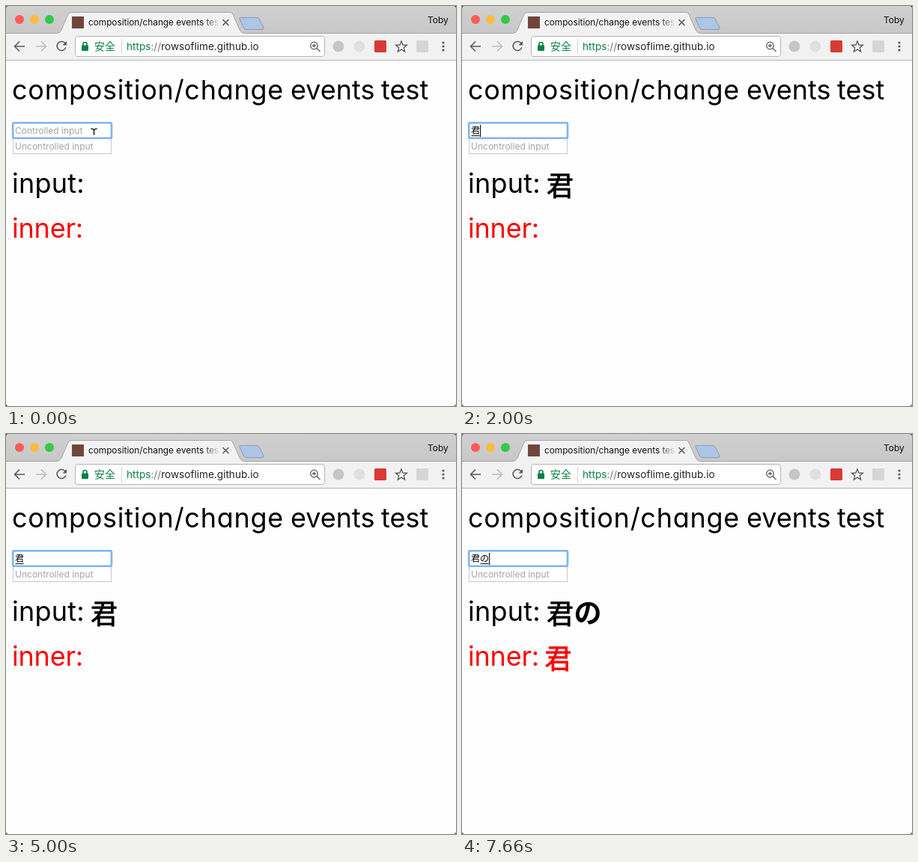
Animation, 601 px wide and 535 px high, one loop 8 s. Source, as an HTML page:

```html
<!DOCTYPE html>
<html lang="ja">
<head>
<meta charset="utf-8">
<title>composition/change events test</title>
<style>
  html, body { margin: 0; width: 100%; height: 100%; overflow: hidden; background: #fefefe; }
  svg { display: block; width: 601px; height: 535px; }
  text { font-family: Inter, "Noto Sans CJK JP", "Noto Sans CJK TC", sans-serif; white-space: pre; }
  .head { font-size: 36px; font-feature-settings: "cv11"; }
  .small { font-size: 12px; }
  .hint { fill: #a3a3a3; }
  .cjk { font-family: "Noto Sans CJK JP", "Noto Sans CJK SC", sans-serif; }
  .kanji { font-size: 36px; font-weight: 500; stroke-width: .8; }
  .kana { font-size: 37px; font-weight: 700; }
  .menu { font: 700 16px "Noto Serif CJK JP", "Noto Sans CJK JP", serif; }
  .line { fill: none; stroke: #5a5a5a; stroke-width: 1.6; }
  #popup { filter: drop-shadow(0 2px 4px rgba(0, 0, 0, .3)); }
</style>
</head>
<body>
<svg viewBox="0 0 601 535">
  <defs>
    <linearGradient id="strip" x2="0" y2="1">
      <stop stop-color="#d0d0d0"/><stop offset="1" stop-color="#c8c8c8"/>
    </linearGradient>
    <linearGradient id="fade" gradientUnits="userSpaceOnUse" x1="264" x2="286">
      <stop stop-color="#111"/><stop offset="1" stop-color="#111" stop-opacity="0"/>
    </linearGradient>
  </defs>

  <!-- tab strip -->
  <rect width="601" height="37" fill="url(#strip)"/>
  <circle cx="18" cy="18" r="6" fill="#fc5b57"/>
  <circle cx="38" cy="18" r="6" fill="#fdbc40"/>
  <circle cx="58" cy="18" r="6" fill="#34c84a"/>
  <rect y="36" width="601" height="37" fill="#f2f2f2"/>
  <path d="M0 36.5H68Q72 36 74 32L83 11Q84 8.500 87 8.500H299Q302 8.500 303 11L312 32Q314 36 318 36.500H601" fill="#f2f2f2" stroke="#a6a6a6"/>
  <path d="M313 15.500H335Q337 15.500 338 17L344 29Q345 31.500 342 31.500H321Q319 31.500 318 30L312 17.500Q311 15.500 313 15.500Z" fill="#adc5e7" stroke="#8f9bab"/>
  <rect x="88" y="14" width="16" height="16" fill="#70463c"/>
  <text x="110" y="26" font-size="11.8" fill="url(#fade)">composition/change events tes</text>
  <path d="M289.500 18L297.500 26M297.500 18L289.500 26" class="line"/>
  <text x="563" y="23" class="small" fill="#111">Toby</text>

  <!-- toolbar -->
  <path d="M0 72.500H601" stroke="#b6b6b6"/>
  <path d="M25 54H12M18 47.500L11.500 54L18 60.500" class="line"/>
  <path d="M40 54H53M47 47.500L53.500 54L47 60.500" class="line" style="stroke:#bcbcbc"/>
  <path d="M79 50A6 6 0 1 0 79.800 55.500" class="line"/>
  <path d="M81 47V52.500H75.500Z" fill="#5a5a5a"/>
  <rect x="92.500" y="40.500" width="333" height="27" rx="3" fill="#fff" stroke="#b5b5b5"/>
  <rect x="101" y="52.500" width="9" height="7.500" rx="1" fill="#0b8043"/>
  <path d="M103 53V51A2.500 2.500 0 0 1 108 51V53" class="line" style="stroke:#0b8043"/>
  <text x="118" y="59" font-size="14" fill="#0b8043" class="cjk">安全</text>
  <path d="M154.500 44V65" stroke="#d2d2d2"/>
  <text x="161" y="59" font-size="13.6" fill="#222"><tspan fill="#0b8043">https</tspan><tspan fill="#777">://</tspan>rowsoflime.github.io</text>
  <g class="line" style="stroke-width:1.300">
    <circle cx="411.500" cy="53" r="4.800"/>
    <path d="M409 53H414M411.500 50.500V55.500M415 56.500L419.500 61"/>
    <path d="M528 47L530 52L535.500 52.300L531.300 55.800L532.700 61L528 58.100L523.300 61L524.700 55.800L520.500 52.300L526 52Z"/>
  </g>
  <circle cx="444" cy="54" r="7.500" fill="#c6c6c6"/>
  <circle cx="472" cy="54" r="7.500" fill="#e0e0e0"/>
  <rect x="492" y="46" width="16" height="16" rx="1.500" fill="#d93a35"/>
  <rect x="548" y="46" width="16" height="16" rx="1.500" fill="#d6d6d6"/>
  <g fill="#5a5a5a">
    <circle cx="584" cy="49" r="1.600"/><circle cx="584" cy="54" r="1.600"/><circle cx="584" cy="59" r="1.600"/>
  </g>

  <!-- page -->
  <rect y="73" width="601" height="462" fill="#fefefe"/>
  <g class="head">
    <text x="8" y="125" letter-spacing=".75">composition/change</text>
    <text x="380" y="125">events</text>
    <text x="501" y="125">test</text>
    <text x="8" y="250" letter-spacing=".25">input:</text>
    <text x="8" y="310" letter-spacing="-.2" fill="#f00">inner:</text>
    <g id="input" stroke="#000" stroke-width="0"></g>
    <g id="inner" fill="#f00" stroke="#f00" stroke-width="0"></g>
  </g>
  <rect x="9.500" y="177.500" width="131" height="20" fill="#fff" stroke="#c9c9c9"/>
  <text x="12" y="192" class="small hint">Uncontrolled input</text>
  <rect x="9.200" y="156.200" width="131.800" height="20.600" rx="1.500" fill="#fff" stroke="#7db4f2" stroke-width="2.600"/>
  <text id="hint" x="12" y="171" class="small hint">Controlled input</text>
  <g id="field" class="small"></g>
  <rect id="mark" y="173" height="1" fill="#111"/>
  <rect id="caret" y="159" width="1" height="16"/>
  <path id="pointer" d="M113.500 164Q117 164 117.500 167Q118 164 121.500 164M117.500 166V172.500" fill="none" stroke="#222" stroke-width="1.500"/>

  <!-- candidate list -->
  <g id="popup">
    <rect x="1.500" y="179.500" width="95" height="158.500" rx="4" fill="#fff" stroke="#c4c4c4" stroke-width=".7"/>
    <path d="M2 207V184Q2 180 6 180H81V207Z" fill="#f6f6f6"/>
    <path d="M81 180H92Q96 180 96 184V316H81Z" fill="#f9f9f9"/>
    <path d="M81.500 180V316" stroke="#e7e7e7"/>
    <rect x="85" y="236" width="8" height="62" rx="4" fill="#c1c1c1"/>
    <rect x="5.500" y="210.500" width="72" height="20" rx="3" fill="#e4eefc" stroke="#b4cdf0"/>
    <g id="items"></g>
    <text x="32" y="331" font-size="10" fill="#909090" class="cjk">⋯更多</text>
  </g>

  <!-- window corners -->
  <path d="M0 531V535H4Q0 535 0 531ZM601 531V535H597Q601 535 601 531ZM0 4V0H4Q0 0 0 4ZM601 4V0H597Q601 0 601 4Z" fill="#555"/>
</svg>
<script>
const LOOP = 8000;
const $ = id => document.getElementById(id);

// time, typed text, first underlined character, caret x (0 = hidden), inner text
const steps = [
  [0, '', 0, 0, ''],
  [160, '', 0, 12, ''],
  [330, 'k', 0, 19, ''],
  [660, 'き', 0, 24, ''],
  [1160, 'き', 0, 0, ''],
  [1660, 'き', 0, 24, ''],
  [1830, 'きm', 0, 35, ''],
  [2000, '君', 0, 24, ''],
  [2500, '君', 0, 0, ''],
  [3000, '君', 0, 24, ''],
  [3500, '君', 0, 0, ''],
  [5830, '君', 1, 24, '君'],
  [6330, '君', 1, 0, '君'],
  [6830, '君', 1, 24, '君'],
  [7330, '君', 1, 0, '君'],
  [7500, '君n', 1, 32, '君'],
  [7660, '君の', 1, 36, '君']
];
const smallWidth = { k: 7, m: 11, n: 7 };

function addText(parent, str, x, y, cls) {
  const el = document.createElementNS('http://www.w3.org/2000/svg', 'text');
  el.setAttribute('x', x);
  el.setAttribute('y', y);
  el.setAttribute('class', cls);
  el.textContent = str;
  parent.append(el);
}

function drawLarge(id, str, x, y) {
  const group = $(id);
  group.replaceChildren();
  [...str].forEach((ch, i) => {
    const left = x + i * 37;
    if (ch < '\x7f') addText(group, ch, left, y, 'head');
    else if (ch === '君') addText(group, ch, left, y + 3.5, 'cjk kanji');
    else addText(group, ch, left - .5, y + 2.5, 'cjk kana');
  });
}

function show([, typed, from, caret, inner]) {
  $('field').replaceChildren();
  let x = 12, start = 12;
  [...typed].forEach((ch, i) => {
    if (i === from) start = x;
    addText($('field'), ch, x, 171, ch < '\x7f' ? 'small' : 'small cjk');
    x += smallWidth[ch] || 12;
  });
  $('mark').setAttribute('x', start + .5);
  $('mark').setAttribute('width', from < typed.length ? x - start - 1 : 0);
  $('caret').setAttribute('x', caret);
  $('caret').style.display = caret ? '' : 'none';
  $('hint').style.display = $('pointer').style.display = typed ? 'none' : '';
  drawLarge('input', typed, 113, 250);
  drawLarge('inner', inner, 110.5, 310);
}

['きみ', '君', 'きみ', 'キミ', '気味'].forEach((word, i) =>
  addText($('items'), word, 11, 198 + i * 27.2, 'menu'));

const origin = performance.now();
let current;
function tick() {
  const t = Math.max(0, performance.now() - origin) % LOOP;
  const step = steps.findLast(s => s[0] <= t);
  if (step !== current) show(current = step);
  $('popup').style.display = t >= 3660 && t < 5000 ? '' : 'none';
  requestAnimationFrame(tick);
}
tick();
</script>
</body>
</html>
```
